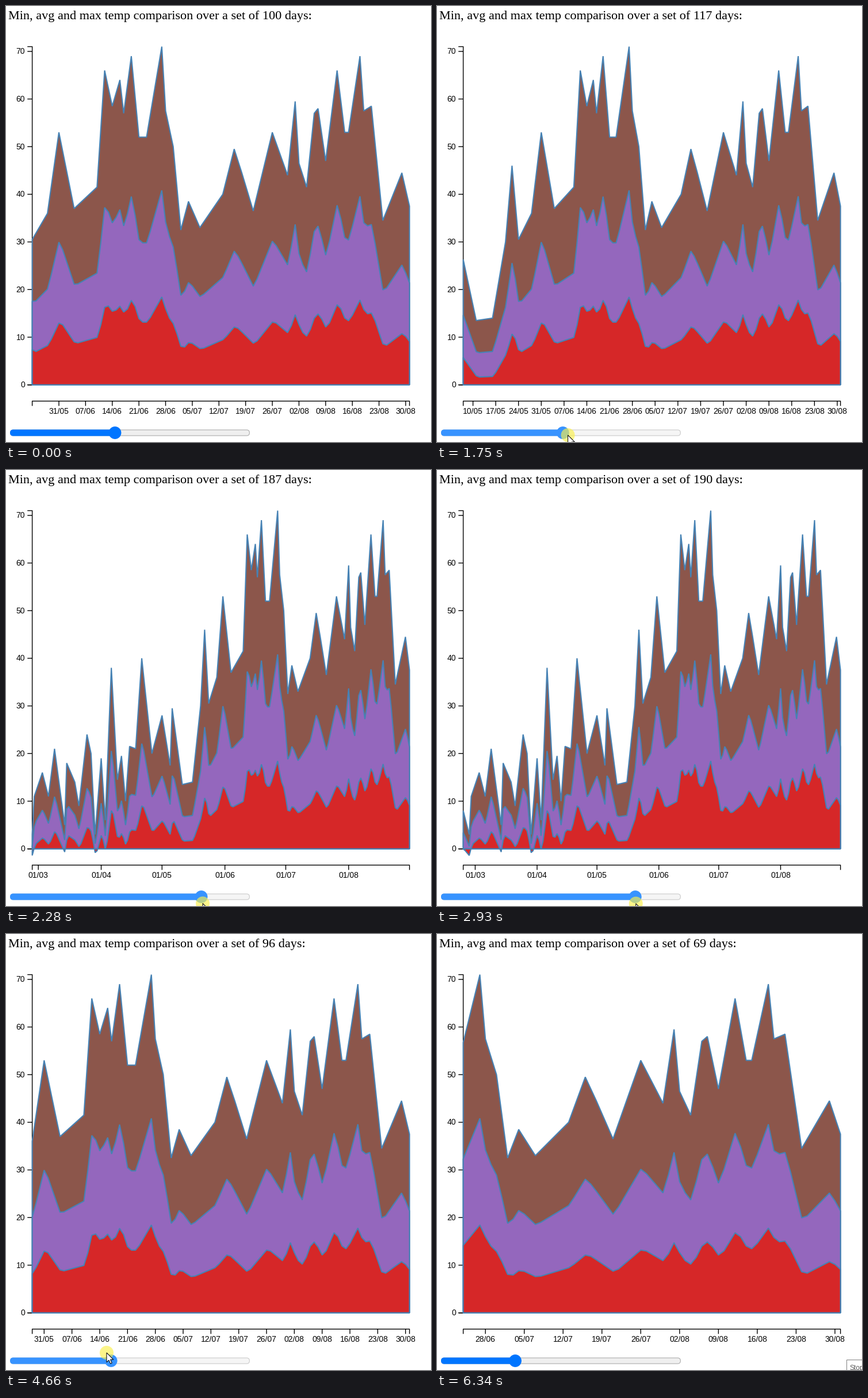
Recreate the animation shown at these times as a matplotlib script. Size 739 px wide and 757 px high, loop 6.44 s.

```python
import numpy as np
import matplotlib.pyplot as plt
from matplotlib.animation import FuncAnimation
from matplotlib.patches import Circle, FancyBboxPatch, Polygon, Rectangle

plt.rcParams["text.hinting"] = "native"

W, H, DPI = 739, 757, 64
LOOP, STEP = 6440, 20
ZOOM = 1.39
LEFT, RIGHT = 45.6, 701.6
BASE, UNIT, AXIS_Y = 657.7, 8.27, 686
DAYS = 190

# Turning points of the daily maximum: (day, value)
TURNS = [(0, 8), (3, 3), (4, 11), (8, 16), (11, 11), (14, 21), (19, 5),
         (20, 18), (24, 14), (26, 9), (30, 24), (32, 20), (34, 3), (37, 19),
         (39, 6), (42, 38), (45, 14.5), (47, 19.5), (49, 10), (51, 21.5),
         (54, 21), (57, 40), (62, 20), (67, 28), (71, 17.5), (72, 29.5),
         (77, 13.5), (82, 14), (86, 30), (88, 46), (90, 30.5), (94, 36),
         (97, 53), (101, 37), (107, 41.5), (109, 66), (111, 58.5), (113, 64),
         (114, 57), (116, 69), (118, 52), (120, 52), (124, 71), (125, 57.5),
         (127, 50), (129, 32.5), (131, 38.5), (134, 33), (140, 40),
         (143, 49.5), (145, 44.5), (148, 36.5), (153, 53), (157, 44),
         (159, 59.5), (160, 46.5), (162, 41.5), (164, 57), (165, 58),
         (167, 47), (170, 66), (172, 53), (173, 53), (176, 69), (177, 57.5),
         (179, 58.5), (182, 34.5), (187, 44.5), (189, 37.5)]

# Key times of the dragged value and the pointer
COUNT = [(1520, 100), (1620, 102), (1940, 141), (2280, 187), (2420, 190),
         (4300, 190), (4340, 172), (4660, 96), (4700, 91), (4800, 79),
         (4990, 69)]
ARRIVE = [(100, 472), (710, 197), (1020, 190.5)]
LEAVE = [(5220, 137), (5400, 120)]
POINTER_Y = [(100, 724), (1020, 742), (1520, 742), (2280, 752.5), (3520, 753),
             (3860, 741), (4150, 741), (4660, 727), (5220, 725), (5400, 760)]
# Slider fill, track and border by state
SKIN = {
    "idle": ("#0075ff", "#efefef", "#b2b2b2"),
    "hover": ("#005cc8", "#e5e5e5", "#b2b2b2"),
    "drag": ("#3793ff", "#f5f5f5", "#cecece"),
}
ARROW = np.array([(0, 0), (0, 16.5), (3.9, 12.9), (6.6, 19), (9.2, 17.9),
                  (6.6, 11.9), (11.8, 11.9)])


def pt(px):
    return px * 72 / DPI


def at(keys, t):
    return np.interp(t, *zip(*keys))


# The mean falls further below the maximum on days that warm up
high = at(TURNS, np.arange(DAYS))
gap = 1.4 + .08 * np.diff(high, prepend=high[0])
mid = .6 * high - gap
low = .5 * mid - .9 - .6 * gap

SPANS = [(2, 24, 29), (3, 1, 31), (4, 1, 30), (5, 1, 31), (6, 1, 30),
         (7, 1, 31), (8, 1, 31)]
DATES = [(d, m) for m, start, end in SPANS for d in range(start, end + 1)]


def thumb_x(n):
    return 17 + 1.725 * n


def pointer(t):
    if t < 1520:
        x = at(ARRIVE, t)
    elif t < 5220:
        x = thumb_x(at(COUNT, t + 40)) + 1  # the slider lags behind
    else:
        x = at(LEAVE, t)
    return x, at(POINTER_Y, t)


def pressed(t):
    return 1520 <= t < 2930 or 4150 <= t < 5220


def slider_state(t, x, y):
    if pressed(t):
        return "drag"
    inside = 7 <= x <= 424 and 731 <= y <= 751.5
    return "hover" if 100 <= t < 5400 and inside else "idle"


def segments(lines):
    gaps = [[*line, (np.nan, np.nan)] for line in lines]
    return np.array([p for line in gaps for p in line]).T


def label(x, y, text, size, family, **kw):
    return ax.text(x, y, text, fontsize=pt(size), family=family,
                   va="baseline", **kw)


def pill(x, w, **kw):
    return ax.add_patch(FancyBboxPatch(
        (x, 736), w, 10, boxstyle="round,pad=0,rounding_size=5", **kw))


fig = plt.figure(figsize=(W / DPI, H / DPI), dpi=DPI, facecolor="white")
ax = fig.add_axes([0, 0, 1, 1])
ax.set_xlim(0, W)
ax.set_ylim(H, 0)
ax.axis("off")

title = label(3.8, 23.3, "", 22.3, "Liberation Serif", color="black")

# Vertical axis
TICK = 6 * ZOOM
axis_style = dict(color="black", lw=pt(ZOOM), solid_capstyle="butt",
                  snap=False, zorder=1)
top = BASE - 71 * UNIT
rows = [(v, BASE - v * UNIT) for v in range(0, 71, 10)]
spine = [(LEFT - TICK, top), (LEFT, top), (LEFT, BASE), (LEFT - TICK, BASE)]
ax.plot(*segments([spine] + [[(LEFT - TICK, y), (LEFT, y)] for _, y in rows]),
        **axis_style)
for v, y in rows:
    label(33, y + 4.5, str(v), 13.9, "Liberation Sans", ha="right")

# Horizontal axis
ticks, = ax.plot([], [], **axis_style)
names = [label(0, AXIS_Y + 22.4, "", 13.9, "Liberation Sans", ha="center")
         for _ in range(24)]

layers = []
for data, color in ((high, "#8c564b"), (mid, "#9467bd"), (low, "#d62728")):
    area = Polygon([(0, 0), (1, 1), (1, 0)], fc=color, ec="steelblue",
                   lw=pt(1.5 * ZOOM), joinstyle="bevel", zorder=2)
    layers.append((ax.add_patch(area), data))

track = pill(7.6, 415.8, lw=pt(1.2), zorder=3)
fill = pill(7.6, 100, lw=pt(1.2), zorder=4)
thumb = ax.add_patch(Circle((0, 741), 10.9, lw=0, zorder=5))
glow = ax.add_patch(Circle((0, 0), 12, fc="#fbf04a", alpha=.65, lw=0, zorder=6))
arrow = ax.add_patch(Polygon(ARROW, fc="white", ec="black", lw=pt(1), zorder=7))

tip_box = ax.add_patch(Rectangle((711.5, 738.5), 60, 40, fc="white",
                                 ec="#808080", lw=pt(1), zorder=8))
tip_text = label(717, 757, "Stop", 12, "Liberation Sans", color="#575757",
                 zorder=9, clip_on=True)


def draw_chart(n):
    first = DAYS - n
    xs = np.linspace(LEFT, RIGHT, n)
    for area, data in layers:
        curve = np.column_stack([xs, BASE - UNIT * data[first:]])
        area.set_xy([(LEFT, BASE), *curve, (RIGHT, BASE)])

    # Sundays on short ranges, first days of the month on long ones
    weekly = n <= 145
    marks = [i for i in range(first + 1, DAYS)
             if (i % 7 == 6 if weekly else DATES[i][0] == 1)]
    end = AXIS_Y + TICK
    lines = [[(LEFT, end), (LEFT, AXIS_Y), (RIGHT, AXIS_Y), (RIGHT, end)]]
    lines += [[(xs[i - first], AXIS_Y), (xs[i - first], end)] for i in marks]
    ticks.set_data(*segments(lines))
    for k, name in enumerate(names):
        name.set_visible(k < len(marks))
        if k < len(marks):
            i = marks[k]
            name.set_x(xs[i - first])
            name.set_text("%02d/%02d" % DATES[i])


def draw_slider(n, state):
    main, back, edge = SKIN[state]
    x = thumb_x(n)
    track.set(facecolor=back, edgecolor=edge)
    fill.set(facecolor=main, edgecolor=main)
    fill.set_width(x - 7.6)
    thumb.set(center=(x, 741), facecolor=main)


def update(frame):
    t = frame * STEP
    n = int(round(at(COUNT, t)))
    x, y = pointer(t)
    title.set_text(f"Min, avg and max temp comparison over a set of {n} days:")
    draw_chart(n)
    draw_slider(n, slider_state(t, x, y))

    arrow.set_xy(ARROW + (x, y))
    arrow.set_visible(100 <= t < 5400)
    glow.set(center=(x, y), visible=pressed(t))

    shown = 0 if t < 6280 else .5 if t < 6340 else 1
    tip_box.set_alpha(shown)
    tip_text.set_alpha(shown)
    return []


anim = FuncAnimation(fig, update, frames=LOOP // STEP, interval=STEP,
                     repeat=True, repeat_delay=0, cache_frame_data=False)
plt.show()
```
